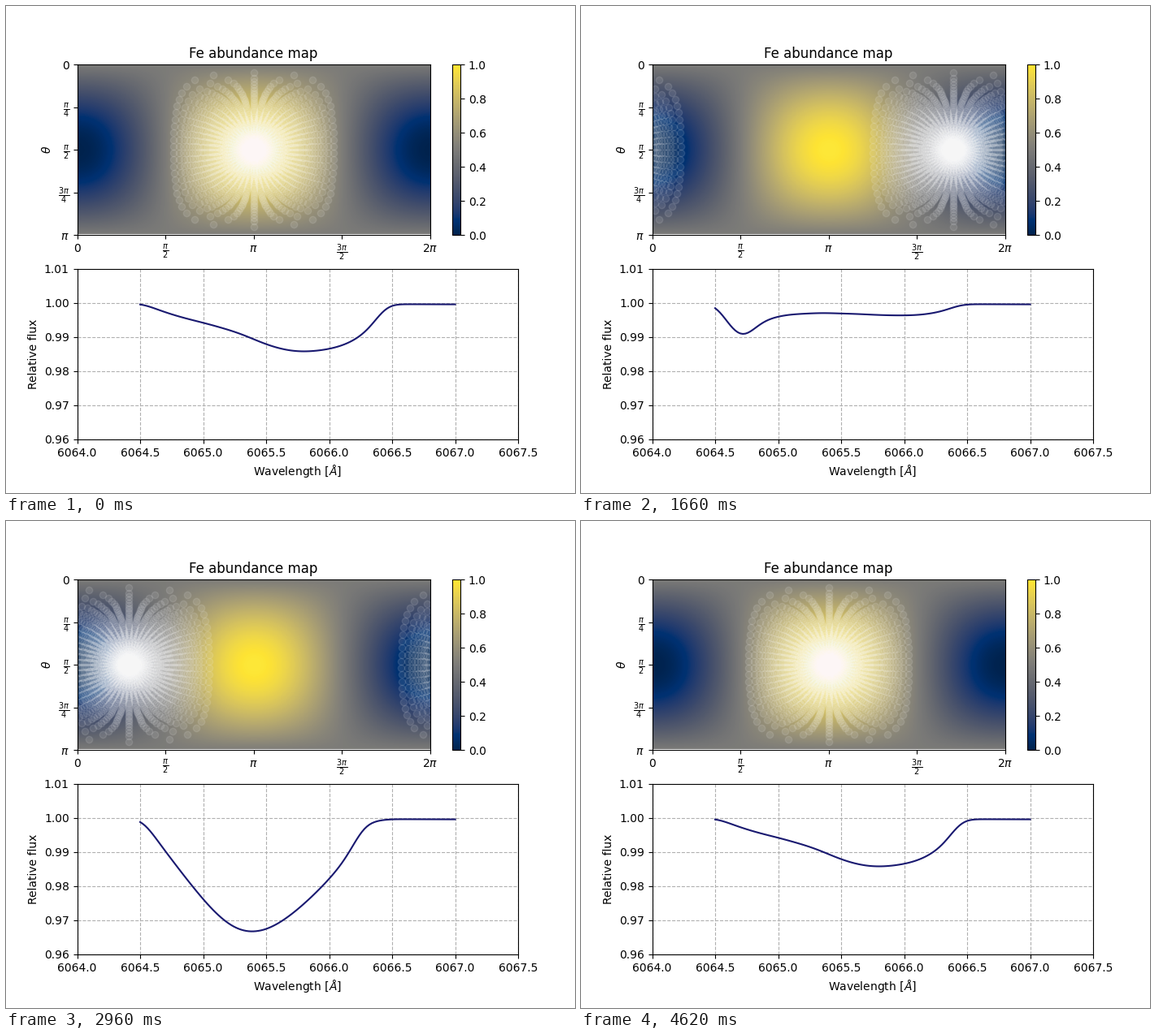
Animation of 700x600 px, one loop 4640 ms. Source, as a matplotlib script:

```python
import numpy as np
import matplotlib.pyplot as plt
from matplotlib.animation import FuncAnimation

PI = np.pi
STEPS = 100              # rotation steps per loop
TICK = 20                # ms; each three steps last 20, 100 and 20 ms
TICKS = 232

# Visible stellar disk, sampled in rings and rays
RINGS, RAYS = 49, 50
radius, angle = np.meshgrid((np.arange(RINGS) + 0.5) / RINGS,
                            np.arange(RAYS) * 2 * PI / RAYS)
radius, angle = radius.ravel(), angle.ravel()
disk_x = radius * np.sin(angle)
mu = np.sqrt(1 - radius ** 2)
colat = np.arccos(radius * np.cos(angle))
lon = np.arctan2(disk_x, mu)

# Rotationally broadened line: one Gaussian per surface point
LINE, V_MAX, SIGMA, LIMB = 6065.48, 0.94, 0.072, 0.6
wave = np.linspace(6064.5, 6067.0, 126)
weight = radius * (1 - LIMB + LIMB * mu)
weight /= weight.sum()
shift = wave[None, :] - LINE - V_MAX * disk_x[:, None]
kernel = np.exp(-0.5 * (shift / SIGMA) ** 2) / (SIGMA * np.sqrt(2 * PI))
continuum = 0.9998 - 0.0001 * (wave - 6065.2)

# Line strength (mA) against stellar longitude (degrees), with a jump at 358
STRENGTH_LON = [-2, 12, 23, 38, 50, 62, 70, 80, 86, 95, 108, 128, 146, 163,
                179, 195, 212, 230, 245, 260, 275, 295, 320, 340, 358]
STRENGTH = [31, 33.5, 36.5, 41, 44, 46, 46.5, 44.5, 42, 38.5, 32.5, 26.5, 22,
            19.5, 16, 12, 9.7, 9, 8, 6.8, 5.2, 4, 3.6, 3.8, 3.8]


def center_lon(step):
    return PI + 2 * PI * step / (STEPS - 1)


def spot_positions(step):
    return np.column_stack([(center_lon(step) + lon) % (2 * PI), colat])


def line_profile(step):
    surface = np.degrees(center_lon(step) - lon)
    surface = (surface + 2) % 360 - 2
    strength = 0.001 * np.interp(surface, STRENGTH_LON, STRENGTH)
    return continuum - (weight * strength) @ kernel


def step_at(tick):
    group, rest = divmod(tick, 7)
    return 3 * group + (rest > 0) + (rest > 5)


fig, (ax_map, ax_flux) = plt.subplots(2, 1, figsize=(7, 6), dpi=100)

# Abundance map; it stops just short of the lower edge
bottom = PI * (1 - 1.2 / 210)
theta = (np.arange(209) + 0.5) / 209 * bottom
phi = (np.arange(434) + 0.5) / 434 * 2 * PI
abundance = 0.5 - 0.5 * np.outer(np.sin(theta), np.cos(phi))
image = ax_map.imshow(abundance, cmap="cividis", vmin=0, vmax=1,
                      extent=[0, 2 * PI, bottom, 0], aspect="auto")
fig.colorbar(image, ax=ax_map)
spots = ax_map.scatter(*spot_positions(0).T, color="white", alpha=0.1)
ax_map.set_title("Fe abundance map")
ax_map.set_ylabel(r"$\theta$")
ax_map.set_xticks(np.arange(5) * PI / 2,
                  ["0", r"$\frac{\pi}{2}$", r"$\pi$",
                   r"$\frac{3\pi}{2}$", r"$2\pi$"])
ax_map.set_yticks(np.arange(5) * PI / 4,
                  ["0", r"$\frac{\pi}{4}$", r"$\frac{\pi}{2}$",
                   r"$\frac{3\pi}{4}$", r"$\pi$"])
ax_map.set_xlim(0, 2 * PI)
ax_map.set_ylim(PI, 0)

# Spectrum
flux, = ax_flux.plot(wave, line_profile(0), color="midnightblue")
ax_flux.set_xlim(6064, 6067.5)
ax_flux.set_ylim(0.96, 1.01)
ax_flux.ticklabel_format(useOffset=False)
ax_flux.grid(linestyle="--")
ax_flux.set_xlabel(r"Wavelength [$\AA$]")
ax_flux.set_ylabel("Relative flux")


def update(tick):
    step = step_at(tick)
    spots.set_offsets(spot_positions(step))
    flux.set_ydata(line_profile(step))
    return spots, flux


anim = FuncAnimation(fig, update, frames=TICKS, interval=TICK,
                     repeat=True, repeat_delay=0)
plt.show()
```
